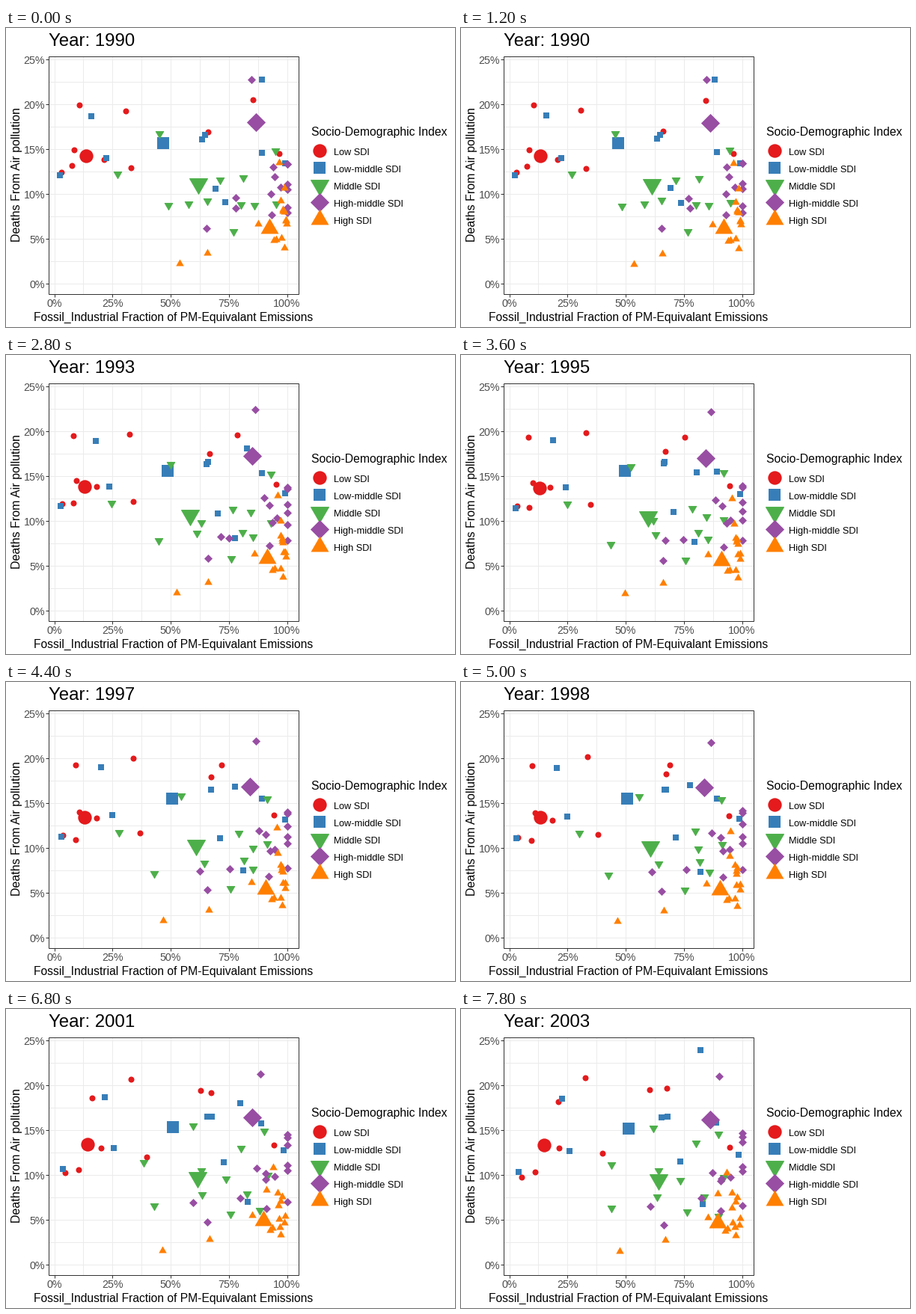
Recreate the animation shown at these times as a matplotlib script. Size 600 px wide and 400 px high, loop 8000 ms.

```python
import numpy as np
import matplotlib.pyplot as plt
from matplotlib.animation import FuncAnimation
from matplotlib.path import Path

W, H, DPI = 600, 400, 100
PX = 72 / DPI                      # points per pixel
FRAMES, STEP = 40, 200
HOLD = 5                           # last still frame before the years advance
YEARS_PER_FRAME = 5 / 13
SMALL, BIG = 3.9, 8.9

plt.rcParams["font.family"] = "Liberation Sans"


def polygon(*pts):
    return Path(list(pts) + [pts[0]], closed=True)


def triangle(up):
    return polygon((0, 1.555 * up), (1.347, -0.778 * up), (-1.347, -0.778 * up))


# marker path, reach of the path in radii, colour, edge width, vertical shift
# (listed in drawing order)
STYLE = {
    "Low SDI": (Path.unit_circle(), 1.03, "#E41A1C", 0, 0),
    "Low-middle SDI": (polygon((-1, -1), (1, -1), (1, 1), (-1, 1)), 0.94, "#377EB8", 0, 0),
    "Middle SDI": (triangle(-1), 1.555, "#4DAF4A", 1, -0.25),
    "High-middle SDI": (polygon((0, 1), (1, 0), (0, -1), (-1, 0)), 1.414, "#984EA3", 0, 0),
    "High SDI": (triangle(1), 1.555, "#FF7F00", 0, 0.25),
}

fig = plt.figure(figsize=(W / DPI, H / DPI), dpi=DPI, facecolor="white")
ax = fig.add_axes([0, 0, 1, 1])
ax.set(xlim=(0, W), ylim=(H, 0))
ax.axis("off")


def line(x0, y0, x1, y1, color, z=1):
    ax.plot([x0, x1], [y0, y1], color=color, lw=PX, zorder=z,
            solid_capstyle="butt", snap=True)


def label(x, y, s, size, color="black", **kw):
    return ax.text(x, y, s, fontsize=size * PX, color=color, **kw)


def marker(group, r, z):
    path, reach, color, edge, _ = STYLE[group]
    art, = ax.plot([], [], ls="none", marker=path, ms=2 * reach * r * PX,
                   mfc=color, mec=color, mew=edge * PX, zorder=z)
    return art


def px(pct):
    return 64.5 + 3.11 * pct


def py(pct):
    return 341.5 - 12 * pct


# panel
LEFT, RIGHT, TOP, BOTTOM = 56.5, 390.5, 37.5, 355.5
for v in np.arange(0, 101, 12.5):
    line(px(v), TOP, px(v), BOTTOM, "#EBEBEB")
for v in np.arange(0, 26, 2.5):
    line(LEFT, py(v), RIGHT, py(v), "#EBEBEB")
for v in range(0, 101, 25):
    line(px(v), BOTTOM, px(v), BOTTOM + 4, "#333333", 2)
    label(px(v), 373, f"{v}%", 14.3, "#4D4D4D", ha="center")
for v in range(0, 26, 5):
    line(LEFT - 4, py(v), LEFT, py(v), "#333333", 2)
    label(52, py(v) + 6, f"{v}%", 14.3, "#4D4D4D", ha="right")
ax.add_patch(plt.Rectangle((LEFT, TOP), RIGHT - LEFT, BOTTOM - TOP, fill=False,
                           ec="#333333", lw=PX, zorder=9, snap=True))

title = label(57, 24, "", 24)
label(224, 392, "Fossil_Industrial Fraction of PM-Equivalant Emissions", 15.6, ha="center")
label(14.5, 196.5, "Deaths From Air pollution", 16, rotation=90, ha="center", va="center")

# legend
label(408, 144, "Socio-Demographic Index", 15.7)
for i, name in enumerate(STYLE):
    row = 163.8 + 23 * i
    marker(name, BIG, 5).set_data([419], [row])
    label(438, row + 6, name, 12.8)

tracks = {(g, r): [] for g in STYLE for r in (SMALL, BIG)}


def move(group, *pts, r=SMALL):
    """Add a path whose key points are evenly spaced over the moving frames."""
    times = np.linspace(HOLD, FRAMES - 1, len(pts))
    tracks[group, r].append((times, *np.array(pts, float).T))


g = "Low SDI"
move(g, (98, 103), (89, 110), (97, 113), (130, 124))
move(g, (160, 111), (170, 102), (166, 92))
move(g, (330, 96), (304, 110), (272, 112), (252, 108))
move(g, (270, 139), (274, 127), (275, 106))
move(g, (91, 163), (98, 174), (109, 181))
move(g, (131, 176), (119, 176), (123, 188), (131, 186))
move(g, (88, 184), (93, 211), (99, 218))
move(g, (74, 193), (76, 205), (81, 225))
move(g, (167, 187), (171, 199), (187, 206), (189, 193))
move(g, (365, 168), (358, 178), (359, 185))
move(g, (107, 171), (105, 181), (111, 182), r=BIG)

g = "Low-middle SDI"
move(g, (114, 118), (127, 114), (135, 120))
move(g, (134, 174), (142, 178), (145, 190))
move(g, (72, 197), (77, 218))
move(g, (280, 215), (293, 204))
move(g, (293, 233), (310, 249), (324, 256), (323, 261))
move(g, (262, 149), (274, 144), (268, 145))
move(g, (266, 143), (274, 144), (276, 144))
move(g, (342, 69), (327, 70), (319, 165), (306, 140), (307, 137), (313, 136), (320, 55))
move(g, (342, 167), (342, 156), (343, 156), (341, 152))
move(g, (373, 181), (374, 187), (372, 182), (371, 195))
move(g, (210, 154), (222, 156), (224, 160), r=BIG)

g = "Middle SDI"
move(g, (205, 142), (234, 153), (257, 160))
move(g, (149, 196), (139, 200), (164, 204), (201, 209))
move(g, (360, 165), (349, 157), (344, 168))
move(g, (317, 201), (327, 211), (330, 223), (295, 227), (293, 230))
move(g, (286, 204), (308, 208), (315, 198), (314, 180))
move(g, (217, 238), (201, 253), (196, 261), (201, 267))
move(g, (244, 236), (265, 243), (262, 252))
move(g, (269, 232), (254, 219), (264, 217))
move(g, (314, 237), (318, 239), (325, 252))
move(g, (332, 238), (330, 251), (344, 278))
move(g, (361, 236), (349, 217), (351, 226))
move(g, (304, 273), (301, 274), (299, 281), (302, 272))
move(g, (257, 211), (246, 216), (254, 221), (252, 225), (264, 231), r=BIG)

g = "High-middle SDI"
move(g, (328, 69), (335, 75), (334, 84), (345, 90))
move(g, (357, 186), (342, 193), (334, 206), (336, 219))
move(g, (359, 199), (347, 204), (348, 227))
move(g, (367, 213), (359, 224), (360, 225))
move(g, (354, 222), (357, 225), (349, 227), (347, 230))
move(g, (307, 241), (296, 247), (303, 253), (321, 253))
move(g, (307, 227), (289, 243), (259, 253), (249, 257), (253, 264))
move(g, (268, 268), (271, 274), (268, 282), (271, 289))
move(g, (355, 250), (347, 270))
# points that stay at 100 %
for ys in (182, 171), (182, 166), (209, 178), (216, 207, 211), (240, 216, 217), (247, 249, 263):
    move(g, *[(376, y) for y in ys])
move(g, (334, 126), (328, 138), (325, 143), (333, 148), r=BIG)

g = "High SDI"
move(g, (365, 180), (362, 195), (355, 219))
move(g, (372, 214), (363, 229), (343, 247))
move(g, (367, 231), (368, 244), (366, 245), (362, 246))
move(g, (370, 243), (369, 252))
move(g, (370, 245), (367, 258))
move(g, (372, 246), (370, 254), (362, 266))
move(g, (337, 262), (328, 268), (330, 279))
move(g, (374, 257), (373, 280))
move(g, (375, 262), (372, 289))
move(g, (374, 258), (370, 269), (363, 286))
move(g, (358, 284), (353, 297))
move(g, (361, 283), (356, 294))
move(g, (368, 281), (367, 289), (366, 292))
move(g, (372, 294), (367, 303))
move(g, (232, 315), (230, 317), (210, 319), (208, 321), (212, 324))
move(g, (269, 301), (273, 309))
move(g, (352, 266), (343, 284), r=BIG)

artists = {key: marker(*key, 3 + 0.1 * i) for i, key in enumerate(tracks)}


def update(k):
    year = 1990 + max(0, k - HOLD) * YEARS_PER_FRAME
    title.set_text(f"Year: {round(year)}")
    for (group, r), paths in tracks.items():
        shift = STYLE[group][4] * r
        xs = [np.interp(k, t, x) - 0.5 for t, x, _ in paths]
        ys = [np.interp(k, t, y) - 0.5 + shift for t, _, y in paths]
        artists[group, r].set_data(xs, ys)
    return [title, *artists.values()]


anim = FuncAnimation(fig, update, frames=FRAMES, interval=STEP,
                     repeat=True, repeat_delay=0)
plt.show()
```
